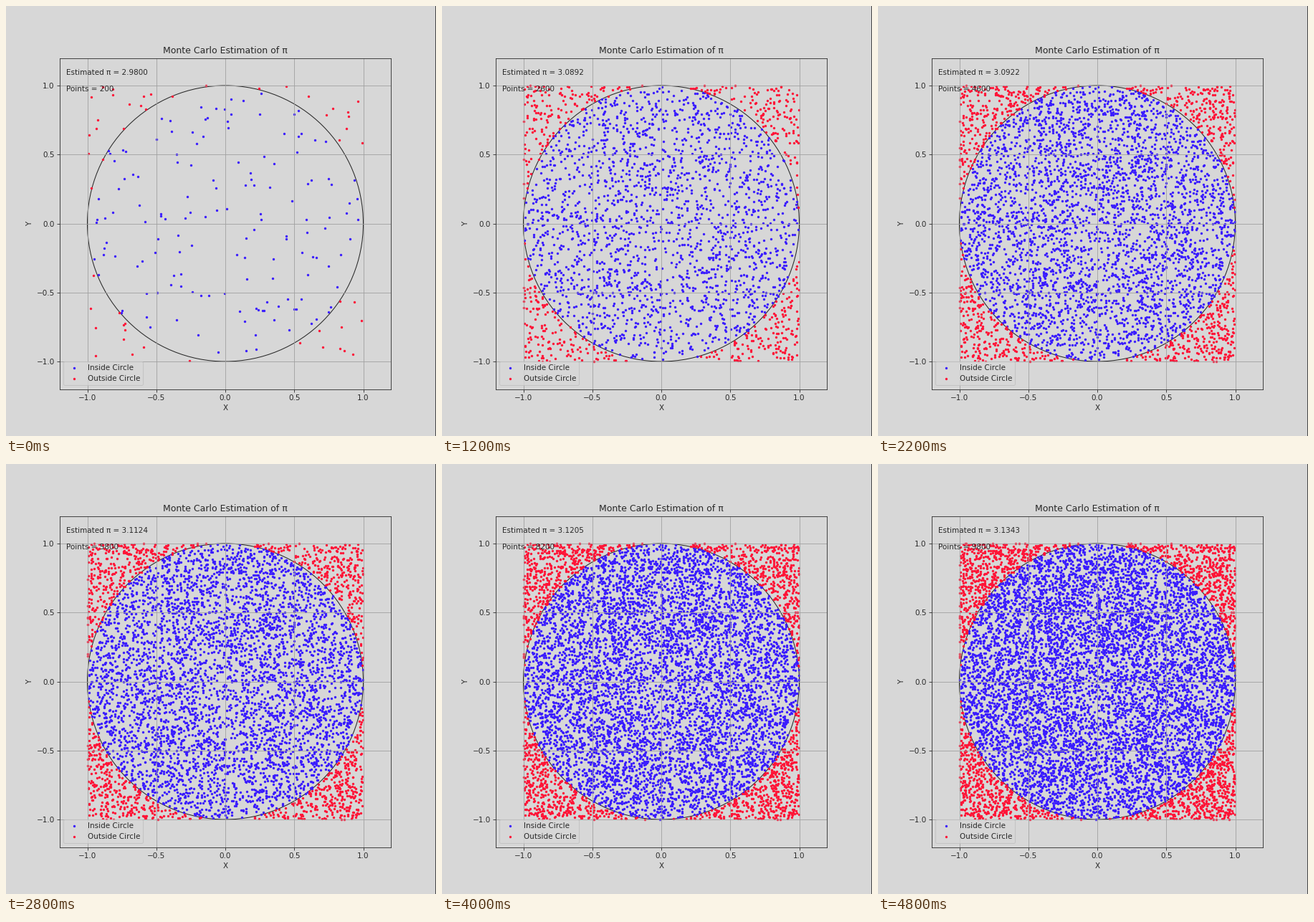
These frames come from a looping animation (600 px wide and 600 px high, 4900 ms). A matplotlib script:

```python
import numpy as np
import matplotlib.pyplot as plt
from matplotlib.animation import FuncAnimation
from matplotlib.lines import Line2D
from matplotlib.patches import Circle

FRAMES, STEP, SIDE = 49, 200, 600
PAPER, INK, GRID = "#d7d7d7", "#282828", "#a0a0a0"
BLUE, RED = "#3a1cff", "#ff1437"

plt.rcParams.update({
    "font.family": "DejaVu Sans", "font.size": 10,
    "text.color": INK, "axes.labelcolor": INK, "axes.edgecolor": INK,
    "xtick.color": INK, "ytick.color": INK, "grid.color": GRID,
    "figure.facecolor": PAPER, "axes.facecolor": PAPER,
})

# The estimate drifts towards pi through a few key values.
totals = STEP * np.arange(1, FRAMES + 1)
drift = np.interp(totals,
                  [200, 2600, 4600, 5800, 7200, 9000, 9800],
                  [2.98, 3.0892, 3.0922, 3.1124, 3.1106, 3.128, 3.1343])
hits = np.rint(totals * drift / 4).astype(int)

# Random darts, split so that each frame can show the right share of both.
rng = np.random.default_rng(7)
darts = rng.uniform(-1, 1, (14000, 2))
is_hit = np.hypot(*darts.T) <= 1
inside, outside = darts[is_hit], darts[~is_hit]

fig = plt.figure(figsize=(8, 8), dpi=75)
ax = fig.add_axes([75 / SIDE, 65.5 / SIDE, 462 / SIDE, 462 / SIDE])
ticks = np.linspace(-1, 1, 5)
ax.set(xlim=(-1.2, 1.2), ylim=(-1.2, 1.2), xticks=ticks, yticks=ticks,
       xlabel="X", ylabel="Y", title="Monte Carlo Estimation of π")
ax.grid(True)
ax.add_patch(Circle((0, 0), 1, fill=False, ec=INK, lw=1))

blue_dots = ax.scatter([], [], s=5, color=BLUE, label="Inside Circle")
red_dots = ax.scatter([], [], s=5, color=RED, label="Outside Circle")
pi_text = ax.text(0.02, 0.95, "", transform=ax.transAxes)
count_text = ax.text(0.02, 0.90, "", transform=ax.transAxes)
ax.legend(loc="lower left", facecolor=PAPER, edgecolor="#c0c0c0")

# Dark rule along the right border of the stage.
edge = (SIDE - 1) / SIDE
fig.add_artist(Line2D([edge, edge], [0, 1], color="#484848", lw=1))


def update(i):
    n, k = totals[i], hits[i]
    blue_dots.set_offsets(inside[:k])
    red_dots.set_offsets(outside[:n - k])
    pi_text.set_text(f"Estimated π = {4 * k / n:.4f}")
    count_text.set_text(f"Points = {n}")
    return blue_dots, red_dots, pi_text, count_text


anim = FuncAnimation(fig, update, frames=FRAMES, interval=100,
                     repeat=True, repeat_delay=0, blit=False)
plt.show()
```
